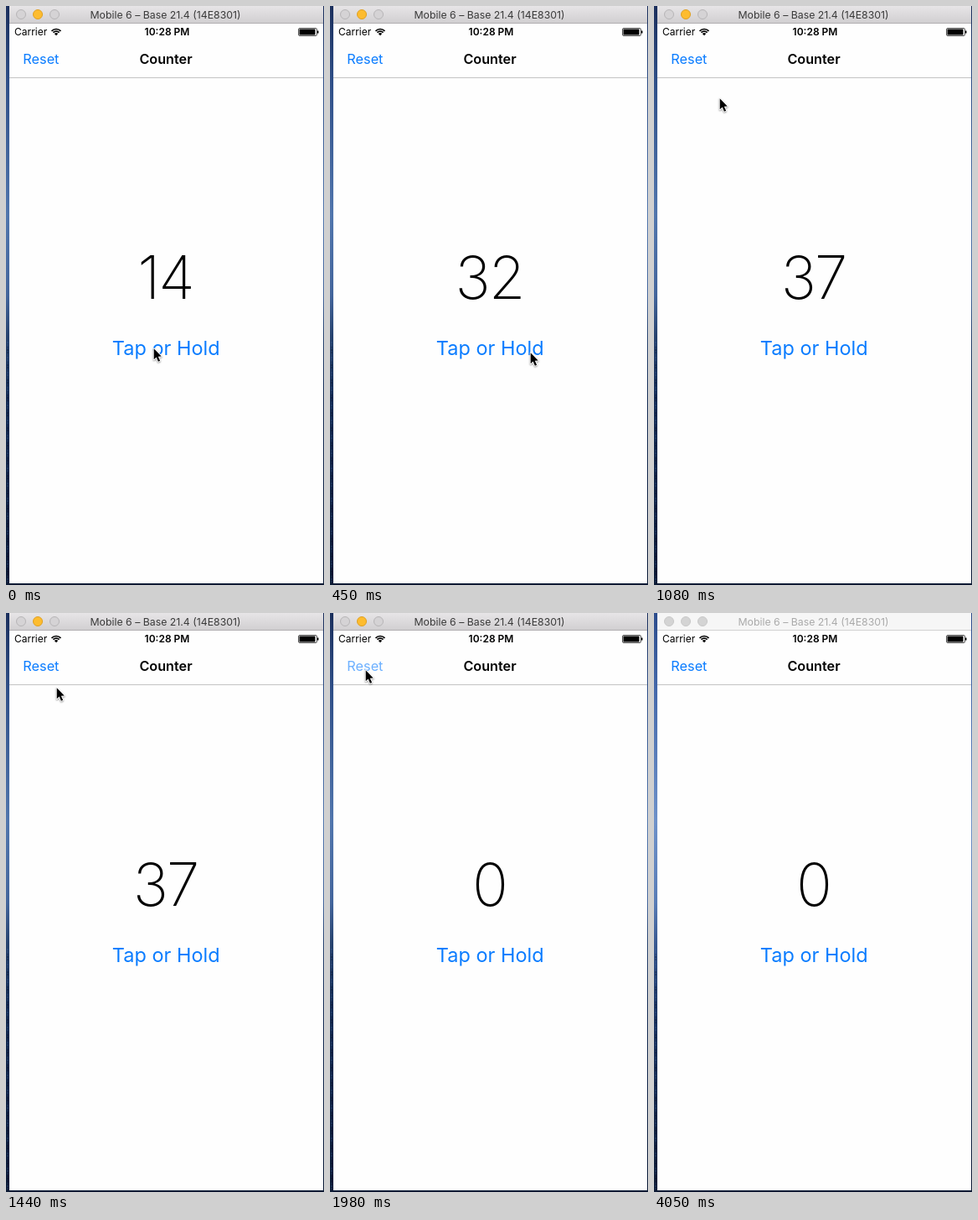
Recreate the animation shown at these times as an HTML page with a canvas. Size 380 by 690 pixels, loop 4.15 s.

```html
<!DOCTYPE html>
<html lang="en">
<head>
<meta charset="utf-8">
<title>Counter</title>
<style>
  html, body { margin: 0; width: 100%; height: 100%; overflow: hidden; background: #fff; }
  canvas { display: block; width: 380px; height: 690px; }
</style>
</head>
<body>
<canvas id="stage" width="380" height="690"></canvas>
<script>
const ctx = document.getElementById('stage').getContext('2d');
const LOOP = 4150, STEP = 90, BLUR_AT = 4050;
const BLUE = '#0a7cff';

// Pointer path: time, x, y
const path = [
  [0, 177, 408], [270, 174, 408], [450, 240, 413], [540, 190, 405],
  [810, 190, 405], [1080, 79, 110], [1170, 79, 110], [1710, 43, 68],
  [1980, 43, 68], [2250, -14, 74]
];

function pointerAt(t) {
  const i = path.findIndex(k => k[0] > t);
  if (i < 0) return path[path.length - 1].slice(1);
  const [t0, x0, y0] = path[i - 1], [t1, x1, y1] = path[i];
  const u = (t - t0) / (t1 - t0), e = u * u * (3 - 2 * u);
  return [Math.round(x0 + (x1 - x0) * e), Math.round(y0 + (y1 - y0) * e)];
}

function countAt(t) {
  return t >= 1890 ? 0 : Math.min(37, Math.round(14 + t / 25));
}

function resetAlpha(t) {
  if (t < 1800 || t >= 2070) return 1;
  return t < 1980 ? 0.25 : 0.6;
}

function rect(x, y, w, h, fill) {
  ctx.fillStyle = fill;
  ctx.fillRect(x, y, w, h);
}

function text(str, x, y, size, weight, fill, align = 'center', tracking = 0) {
  ctx.font = `${weight} ${size}px Inter, sans-serif`;
  ctx.letterSpacing = `${tracking}px`;
  ctx.textAlign = align;
  ctx.fillStyle = fill;
  ctx.fillText(str, x, y);
}

function gradient(height, stops) {
  const g = ctx.createLinearGradient(0, 0, 0, height);
  stops.forEach(([at, color]) => g.addColorStop(at, color));
  return g;
}

function desktop(active) {
  const stops = active
    ? [[0, '#1b2f5c'], [0.13, '#2f4f88'], [0.36, '#5176ad'], [0.5, '#43659c'],
       [0.57, '#27436f'], [0.68, '#132b54'], [0.98, '#0a1a38'], [1, '#0c1a34']]
    : [[0, '#2c4c8c'], [0.13, '#4468aa'], [0.36, '#6e91c9'], [0.5, '#587cb6'],
       [0.57, '#3a5a92'], [0.68, '#1b3564'], [1, '#0c1a34']];
  rect(0, 0, 380, 690, gradient(690, stops));
  // Faint ripples in the dark water
  for (let y = 400; y < 688; y += 3) {
    const wave = Math.sin(y * 12.9);
    rect((y * 7) % 3, y, 2, 2, wave > 0
      ? `rgba(60,100,160,${0.25 * wave})` : `rgba(0,5,20,${-0.3 * wave})`);
  }
}

function titleBar(active) {
  rect(4, 0, 375, 20, active ? gradient(20, [[0, '#e7e5e7'], [1, '#d1cfd1']]) : '#f6f6f6');
  rect(4, 20, 375, 1, active ? '#b1afb1' : '#d2d2d2');
  [18, 38, 58].forEach((x, i) => {
    const lit = active && i === 1;
    ctx.beginPath();
    ctx.arc(x, 10, 5.5, 0, Math.PI * 2);
    ctx.fillStyle = lit ? '#fdbc2f' : active ? '#d5d3d5' : '#d4d4d4';
    ctx.fill();
    ctx.strokeStyle = lit ? '#dfa023' : active ? '#b7b5b7' : '#c9c9c9';
    ctx.lineWidth = 1;
    ctx.stroke();
  });
  text('Mobile 6 – Base 21.4 (14E8301)', 190.5, 15, 12.3, 400, active ? '#3a3a3a' : '#aaa');
}

function wifi(x, y) {
  const a = Math.PI * 0.25, up = -Math.PI / 2;
  ctx.strokeStyle = ctx.fillStyle = '#000';
  ctx.lineWidth = 1.7;
  for (const r of [7.8, 5.1]) {
    ctx.beginPath();
    ctx.arc(x, y, r, up - a, up + a);
    ctx.stroke();
  }
  ctx.beginPath();
  ctx.moveTo(x, y);
  ctx.arc(x, y, 3.1, up - a, up + a);
  ctx.fill();
}

function battery() {
  ctx.strokeStyle = '#555';
  ctx.lineWidth = 1;
  ctx.beginPath();
  ctx.roundRect(349.5, 26.5, 22, 9, 1.5);
  ctx.stroke();
  rect(350.5, 27.5, 19, 7, '#000');
  rect(372, 29.5, 1.5, 3, '#000');
}

function pointer([x, y]) {
  ctx.save();
  ctx.translate(x - 0.3, y + 0.3);
  ctx.scale(0.95, 0.95);
  ctx.beginPath();
  [[0, 0], [0, 13.6], [3.1, 10.8], [5.5, 16.2], [7.8, 15.2], [5.4, 9.9], [9.5, 9.7]]
    .forEach(p => ctx.lineTo(...p));
  ctx.closePath();
  ctx.lineJoin = 'round';
  ctx.lineWidth = 2;
  ctx.strokeStyle = '#fff';
  ctx.shadowColor = 'rgba(0,0,0,0.4)';
  ctx.shadowBlur = 2;
  ctx.shadowOffsetY = 1;
  ctx.stroke();
  ctx.shadowColor = 'transparent';
  ctx.fillStyle = '#000';
  ctx.fill();
  ctx.restore();
}

function draw(time) {
  const active = time < BLUR_AT;
  const t = Math.floor(time / STEP) * STEP;
  desktop(active);
  titleBar(active);
  rect(4, 21, 375, 667, '#fefefe');

  text('Carrier', 10, 35, 12, 400, '#000', 'left');
  wifi(60, 35.3);
  text('10:28 PM', 192.5, 35, 12, 600, '#000');
  battery();

  ctx.globalAlpha = resetAlpha(t);
  text('Reset', 20.3, 69, 16.3, 400, BLUE, 'left');
  ctx.globalAlpha = 1;
  text('Counter', 191, 69, 16.2, 600, '#000');
  rect(4, 85, 375, 1, '#c4c4c4');

  text(countAt(t), 190.5, 349, 71, 200, '#000', 'center', -2);
  text('Tap or Hold', 191.2, 415.7, 23.5, 400, BLUE);
  if (t < 2250) pointer(pointerAt(t));
}

const start = performance.now();
function tick() {
  draw((performance.now() - start) % LOOP);
  requestAnimationFrame(tick);
}
tick();
</script>
</body>
</html>
```
